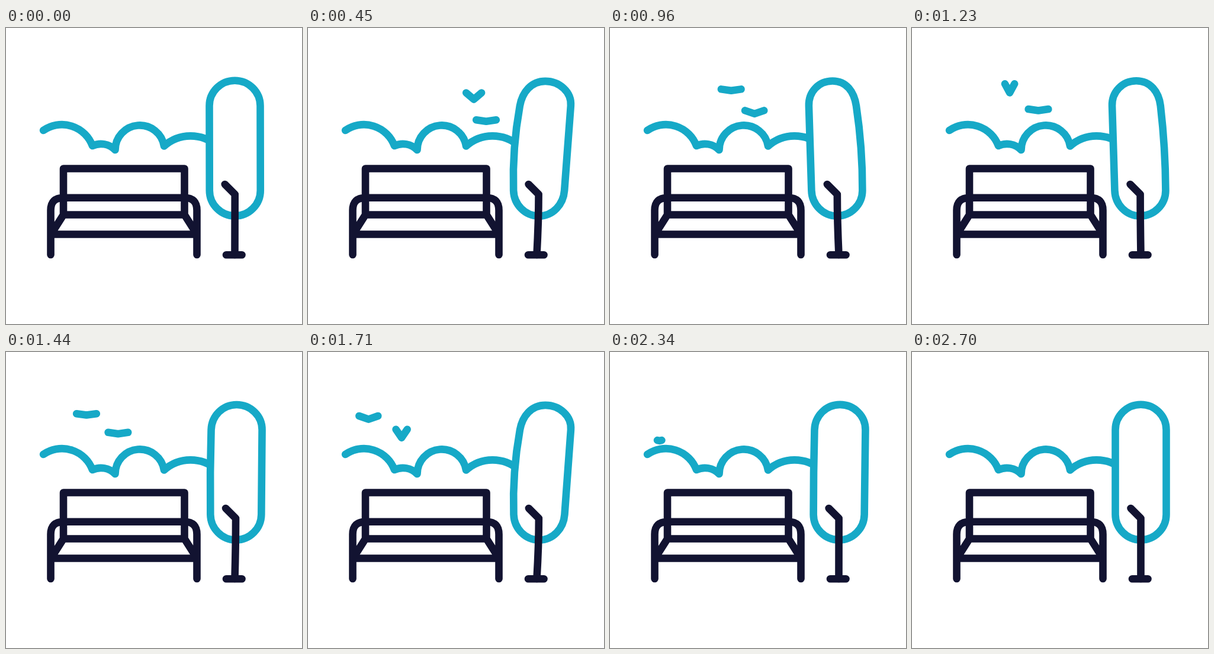
Recreate the animation shown at these times as an HTML page. Size 500 by 500 pixels, loop 2730 ms.

```html
<!DOCTYPE html>
<html lang="en">
<head>
<meta charset="utf-8">
<title>Park bench</title>
<style>
html, body { margin: 0; width: 100%; height: 100%; overflow: hidden; background: #fff; }
svg { display: block; width: 100%; height: 100%; fill: none; stroke-width: 12.6; stroke-linecap: round; stroke-linejoin: round; }
.teal { stroke: #16a9c7; }
.navy { stroke: #121331; }
</style>
</head>
<body>
<svg viewBox="0 0 500 500">
  <g class="teal">
    <path d="M63 173A55 55 0 0 1 146 199A34 34 0 0 1 184.5 206A41.5 41.5 0 0 1 267 199.5A67 67 0 0 1 356 199"/>
    <path id="crown" fill="#fff"/>
    <path id="bird1"/>
    <path id="bird2"/>
  </g>
  <g class="navy">
    <path d="M97 316V237.5H301.5V316M75.5 383V308Q75.5 286.7 97 286.7H301.5Q322.5 286.7 322.5 308V383M75.5 348.5H322.5L301.5 315.5H97L76 348.5"/>
    <path id="trunk"/>
    <path d="M372 383.3H398.5"/>
  </g>
</svg>
<script>
const LOOP = 2730;
const $ = id => document.getElementById(id);
const clamp = v => Math.max(0, Math.min(1, v));
const smooth = u => u * u * (3 - 2 * u);
const mix = (a, b, u) => a + (b - a) * u;

// Turning points of the gust: [time, offset of the treetop]
const gust = [[0, 0], [480, 14.5], [1040, -12], [1790, 15.3], [2500, 0]];

function sway(t) {
  return gust.slice(1).reduce((x, [end, to], i) => {
    const start = gust[i][0];
    return mix(x, to, smooth(clamp((t - start) / (end - start))));
  }, 0);
}

function drawTree(t) {
  // The foot of the crown moves less and slightly ahead of the top
  const a = sway(t), b = sway(t + 75) * .26;
  const top = 386.5 + a, foot = 386.5 + b, y = 88.7 + Math.abs(a) * .08;

  // The side facing away from the lean bows outwards
  function side(dir) {
    const bow = dir * Math.max(0, -dir * a) * .35;
    const hi = top + dir * (43 - .28 * Math.max(0, -a)), lo = foot + dir * 43;
    const upper = mix(hi, lo, 1 / 3) + bow, lower = mix(hi, lo, 2 / 3) + bow;
    return { hi, lo, upper, lower, shoulder: hi + (hi - upper) / 2, heel: lo + (lo - lower) / 2 };
  }
  const l = side(-1), r = side(1);
  $('crown').setAttribute('d', `M${l.lo} 274.5
    C${l.lower} 227 ${l.upper} 179 ${l.hi} 131.5
    C${l.shoulder} 108 ${top - 23.7} ${y} ${top} ${y}
    S${r.shoulder} 108 ${r.hi} 131.5
    C${r.upper} 179 ${r.lower} 227 ${r.lo} 274.5
    C${r.heel} 298 ${foot + 23.7} 317.5 ${foot} 317.5
    S${l.heel} 298 ${l.lo} 274.5Z`);

  const w = b * .85;
  $('trunk').setAttribute('d', `M${369.5 + w} 264L${386.5 + w} 281Q${386.5 + w} 325 386.5 383`);
}

const birds = [
  { id: 'bird1', from: 130, to: 2270, flap: 550, period: 660,
    x: t => 221.3 - 186 * Math.sin((t - 850) / 1240),
    y: t => 99.5 + .021 * Math.hypot(t - 1180, 100) },
  { id: 'bird2', from: 200, to: 2400, flap: 800, period: 860,
    x: t => 350.2 - .108 * t - 2.5e-6 * t * t,
    y: t => 137 + 1.77e-5 * (t - 1500) ** 2 }
];

function drawBird(bird, t) {
  const size = clamp(Math.min((t - bird.from) / 200, (bird.to - t) / 260));
  const node = $(bird.id);
  node.style.display = size ? '' : 'none';
  // Each wing beat is followed by a glide
  const beat = (t - bird.flap) / bird.period;
  const away = Math.abs(beat - Math.round(beat)) * bird.period;
  const angle = mix(8, 63, smooth(clamp(1 - away / 225))) * Math.PI / 180;
  const x = bird.x(t), y = bird.y(t), wing = 17 * size;
  const dx = wing * Math.cos(angle), dy = wing * Math.sin(angle) / 2;
  node.setAttribute('d', `M${x - dx} ${y - dy}L${x} ${y + dy}L${x + dx} ${y - dy}`);
}

function frame() {
  const t = performance.now() % LOOP;
  drawTree(t);
  birds.forEach(bird => drawBird(bird, t));
  requestAnimationFrame(frame);
}
frame();
</script>
</body>
</html>
```
